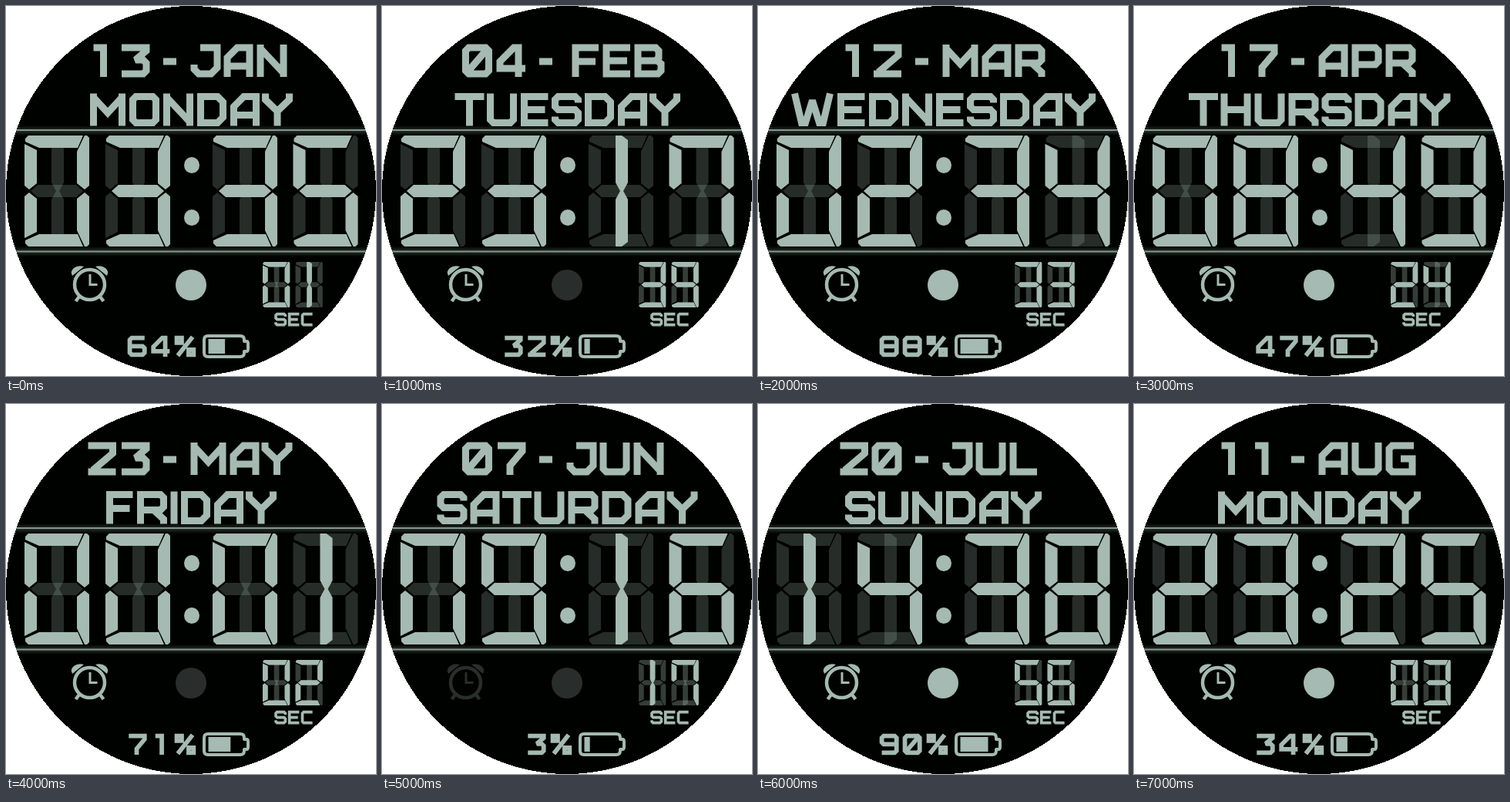
An HTML page for the animation above (8 s loop, 480 px wide and 480 px high).

```html
<!DOCTYPE html>
<html lang="en">
<head>
<meta charset="utf-8">
<title>Digital watch face</title>
<style>
  html, body { margin: 0; width: 100%; height: 100%; overflow: hidden; background: #fff; }
  svg { display: block; width: 100vw; height: 100vh; }
  .lit { --ink: #a4bab2; }
  .dim { --ink: #292e2c; }
  .fill { fill: var(--ink); }
  .line { fill: none; stroke: var(--ink); }
  .ghost { fill: #a4bab2; }
  .type { stroke-width: 9; stroke-miterlimit: 2; }
</style>
</head>
<body>
<svg viewBox="0 0 480 480" role="img" class="lit">
  <defs>
    <clipPath id="round"><circle cx="240" cy="240" r="240"/></clipPath>
    <linearGradient id="glow" x2="0" y2="1">
      <stop offset="0" stop-color="#a4bab2" stop-opacity="0"/>
      <stop offset=".5" stop-color="#a4bab2" stop-opacity=".25"/>
      <stop offset="1" stop-color="#a4bab2" stop-opacity="0"/>
    </linearGradient>
  </defs>
  <circle cx="240" cy="240" r="240" fill="#000200" shape-rendering="crispEdges"/>
  <g id="text"></g>
  <g clip-path="url(#round)">
    <rect y="155" width="480" height="13" fill="url(#glow)"/>
    <rect y="160" width="480" height="2" class="fill" opacity=".75"/>
    <rect y="312" width="480" height="13" fill="url(#glow)"/>
    <rect y="317.5" width="480" height="2" class="fill" opacity=".75"/>
  </g>
  <g class="fill">
    <ellipse cx="241" cy="206.5" rx="10" ry="10.5"/>
    <ellipse cx="241" cy="274.5" rx="10" ry="10.5"/>
  </g>
  <g id="digits"></g>
  <g id="alarm">
    <circle cx="108.5" cy="361.5" r="19.5" class="line" stroke-width="4.5"/>
    <path class="line" stroke-width="3" d="M109 348V361.5H118.5"/>
    <path class="line" stroke-width="4.5" d="M95 377L90.5 383M122 377L126.5 383"/>
    <path class="fill" d="M86 350Q83 344 88 340T101 338ZM131 350Q134 344 129 340T116 338Z"/>
  </g>
  <g id="link"><circle cx="240" cy="362" r="20" class="fill"/></g>
  <path class="line" stroke-width="4" stroke-linejoin="round"
    d="M262 428H304Q309 428 309 433V435H312Q314 435 314 438V445Q314 448 312 448H309V450Q309 455 304 455H262Q257 455 257 450V433Q257 428 262 428Z"/>
  <rect id="charge" x="262.5" y="432" height="19" class="fill"/>
</svg>
<script>
// Stroke outlines on a 42-unit cap height: [width, path]
const FONT = {
  A: [37, 'M4 42V17L17 4H33V42M4 28H33'],
  B: [38, 'M4 21V4H27L31 8V17L27 21H4V38H30L34 34V25L29 21'],
  C: [36, 'M36 4H8L4 8V34L8 38H36'],
  D: [37, 'M4 4H26L33 11V31L26 38H4Z'],
  E: [35, 'M35 4H4V38H35M4 21H31'],
  F: [34, 'M34 4H4V42M4 22H30'],
  G: [38, 'M36 4H8L4 8V34L8 38H34V21H19'],
  H: [38, 'M4 0V42M34 0V42M4 21H34'],
  I: [7, 'M3.5 0V42'],
  J: [38, 'M12 4H34V30L26 38H10L4 32V26'],
  L: [35, 'M4 0V38H35'],
  M: [45, 'M4 42V0M41 42V0M4 5L22.5 25L41 5'],
  N: [38, 'M4 42V0M34 42V0M4 5L34 37'],
  O: [38, 'M8 4H30L34 8V34L30 38H8L4 34V8Z'],
  P: [38, 'M4 42V4H30L34 8V22L30 26H4'],
  R: [38, 'M4 42V4H30L34 8V20L30 24H4M21 24L34 36V42'],
  S: [38, 'M34 12V8L30 4H8L4 8V17L8 21H30L34 25V34L30 38H8L4 34V30'],
  T: [38, 'M0 4H38M19 4V42'],
  U: [38, 'M4 0V34L8 38H30L34 34V0'],
  W: [54, 'M4 0L13 38H18L27 9L36 38H41L50 0'],
  Y: [39, 'M4 0V8L19.5 23L35 8V0M19.5 20V42'],
  0: [38, 'M8 4H30L34 8V34L30 38H8L4 34V8ZM7 35L31 7'],
  1: [38, 'M9 4H22V42'],
  2: [38, 'M2 4H34V14L8 36M2 38H38'],
  3: [38, 'M2 4H34V8L20 20H30L34 24V34L30 38H2'],
  4: [38, 'M29 42V4H23L5 22V31H38'],
  5: [38, 'M36 4H4V21H30L34 25V34L30 38H2'],
  6: [38, 'M34 4H8L4 8V34L8 38H30L34 34V25L30 21H4'],
  7: [38, 'M2 4H34V11L18 30V42'],
  8: [38, 'M8 4H30L34 8V34L30 38H8L4 34V8ZM4 21H34'],
  9: [38, 'M4 38H30L34 34V8L30 4H8L4 8V17L8 21H34'],
  '-': [17, 'M0 22H17'],
  '%': [42, 'M4 4H14V14H4ZM28 28H38V38H28ZM36 2L6 40']
};

// Segment polygons in an 84 x 146 cell
const SEGMENTS = {
  a: 'M5 1H76L69 17H19L1 9V5Z',
  b: 'M78 1H81L84 4V66L78 71L68 63V22Z',
  c: 'M78 75L84 80V142L81 145H78L68 124V83Z',
  d: 'M19 129H69L76 145H5L1 141V137Z',
  e: 'M0 80L6 75L16 83V126L0 134Z',
  f: 'M0 12L16 20V63L6 71L0 66Z',
  g: 'M8 73L17 65H67L76 73L67 81H17Z',
  h: 'M35 1H43L51 7V62L45 73H41L35 62Z',
  i: 'M41 73H45L51 84V139L43 145H35V84Z'
};
const ON = ['abcdef', 'hi', 'abged', 'abgcd', 'fgbc', 'afgcd', 'afgedc', 'abcf', 'abcdefg', 'abcdfg'];

// day, month, month x, weekday, hhmm, seconds, charge, alarm, link
const STEPS = [
  ['13', 'JAN', 240, 'MONDAY', '0335', '01', 64, 1, 1],
  ['04', 'FEB', 247, 'TUESDAY', '2317', '39', 32, 1, 0],
  ['12', 'MAR', 240, 'WEDNESDAY', '0234', '33', 88, 1, 1],
  ['17', 'APR', 240, 'THURSDAY', '0849', '24', 47, 1, 1],
  ['23', 'MAY', 240, 'FRIDAY', '0001', '02', 71, 1, 0],
  ['07', 'JUN', 240, 'SATURDAY', '0916', '17', 3, 0, 0],
  ['20', 'JUL', 240, 'SUNDAY', '1438', '56', 90, 1, 1],
  ['11', 'AUG', 240, 'MONDAY', '2325', '03', 34, 1, 1]
];
const HOLD = 1000;
const $ = id => document.getElementById(id);

const glyph = (ch, x, y, scale = 1) =>
  `<path class="line type" transform="translate(${x} ${y}) scale(${scale})" d="${FONT[ch][1]}"/>`;

const bearing = ch => 'TY'.includes(ch) ? 1 : 'SJ'.includes(ch) ? 2 : 3;

function layout(word) {
  let x = 0;
  const places = [...word].map((ch, i) => {
    if (i) x += bearing(word[i - 1]) + bearing(ch);
    const left = x;
    x += FONT[ch][0];
    return [ch, left];
  });
  return { places, width: x };
}

function drawWord(word, x, y, scale = 1, centred = false) {
  const { places, width } = layout(word);
  const start = centred ? x - width * scale / 2 : x;
  return places.map(([ch, left]) => glyph(ch, start + left * scale, y, scale)).join('');
}

function drawDigit(n, x, y, ghost, sx = 1, sy = 1) {
  const ghosts = Object.values(SEGMENTS)
    .map(d => `<path class="ghost" fill-opacity="${ghost}" d="${d}"/>`).join('');
  const lit = [...ON[n]].map(s => SEGMENTS[s]).join('');
  return `<g transform="translate(${x} ${y}) scale(${sx} ${sy})">${ghosts}<path class="fill" d="${lit}"/></g>`;
}

function render([day, month, monthX, weekday, time, sec, charge, alarm, link]) {
  const percent = String(charge).padStart(2, ' ');
  $('text').innerHTML =
    glyph(day[0], 104.5, 50) + glyph(day[1], 148, 50) + glyph('-', 204, 50) +
    drawWord(month, monthX, 50) +
    drawWord(weekday, 240.5, 113.5, 1, true) +
    drawWord('SEC', 373, 398, .41, true) +
    [...percent].map((ch, i) => ch === ' ' ? '' : glyph(ch, 158 + i * 30, 428, .64)).join('') +
    glyph('%', 219, 428, .64);
  $('digits').innerHTML =
    [24, 129, 268, 372.5].map((x, i) => drawDigit(time[i], x, 167, .23)).join('') +
    [333, 375.5].map((x, i) => drawDigit(sec[i], x, 331.5, .32, .42, .41)).join('');
  $('alarm').setAttribute('class', alarm ? 'lit' : 'dim');
  $('link').setAttribute('class', link ? 'lit' : 'dim');
  $('charge').setAttribute('width', 7.2 * Math.max(1, Math.floor(charge * 6 / 100)));
  document.querySelector('svg').setAttribute('aria-label',
    `${day} - ${month} ${weekday} ${time.slice(0, 2)}:${time.slice(2)} ${sec} SEC ${charge}%`);
}

let shown = -1, begin;
function tick(now) {
  begin ??= now;
  const step = Math.floor(Math.max(0, now - begin) / HOLD) % STEPS.length;
  if (step !== shown) render(STEPS[shown = step]);
  requestAnimationFrame(tick);
}
render(STEPS[0]);
requestAnimationFrame(tick);
</script>
</body>
</html>
```
